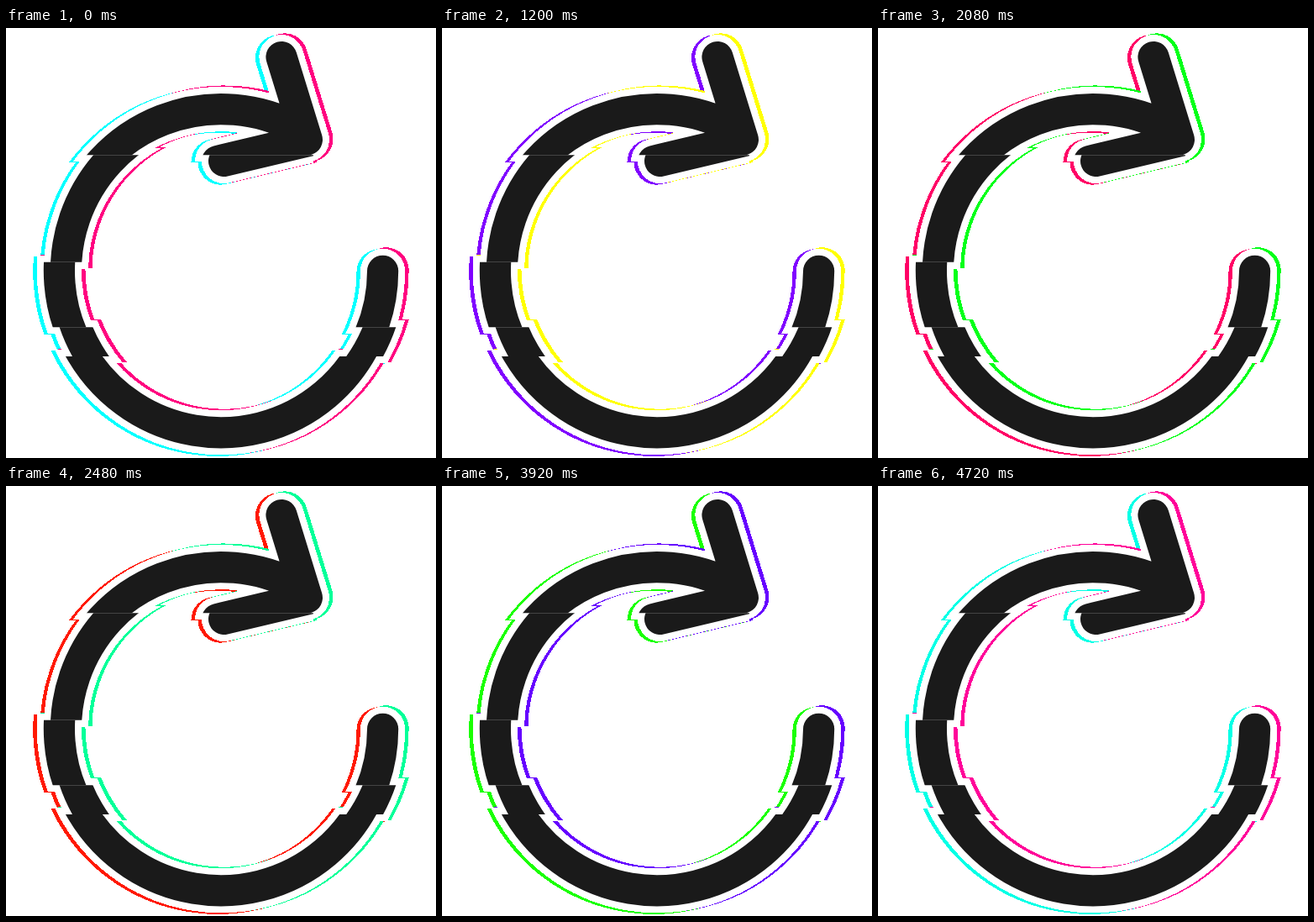
Recreate the animation shown at these times as an HTML page. Size 512 by 512 pixels, loop 4.8 s.

```html
<!DOCTYPE html>
<html>
<head>
<meta charset="utf-8">
<style>
html, body { margin: 0; height: 100%; overflow: hidden; background: #fff; }
svg { display: block; }
</style>
</head>
<body>
<svg id="stage" width="512" height="512" fill="none" stroke-linecap="round" stroke-linejoin="round"></svg>
<script>
const stage = document.getElementById('stage');
const STEP = 80, STEPS = 60;
const STROKE = 37.2, HALO = 8, SHIFT = 8;

// Three quarters of a ring, then the arrow head
const ARROW = 'M448.6 289.3A192.6 192.6 0 1 1 348 120M328 34.5L358.4 133L251.6 158.5';

// Horizontal bands: left, right, top, bottom, sideways shift
const bands = [
  [-20, 532, -20, 151.2, 0],
  [-20, 366, 151.2, 278.85, SHIFT],
  [-20, 380, 278.85, 356.2, 0],
  [380, 532, 240, 356.2, 0],
  [-20, 532, 356.2, 391, SHIFT],
  [-20, 532, 391, 540, 0]
];

function add(parent, tag, attributes) {
  const node = document.createElementNS('http://www.w3.org/2000/svg', tag);
  for (const name in attributes) node.setAttribute(name, attributes[name]);
  return parent.appendChild(node);
}

function addLayer(id, color, halo, extra, x, y) {
  const layer = add(stage, 'g', {
    stroke: color,
    'stroke-width': STROKE + 2 * (halo + extra),
    'shape-rendering': halo ? 'crispEdges' : 'auto',
    transform: `translate(${x} ${y})`
  });
  bands.forEach(([left, right, top, bottom, shift], i) => {
    const clip = add(layer, 'clipPath', { id: id + i });
    const snap = halo ? Math.round : v => v;
    const y0 = snap(top - halo), y1 = snap(bottom + halo);
    add(clip, 'rect', { x: left, y: y0, width: right - left, height: y1 - y0 });
    const band = add(layer, 'g', { 'clip-path': `url(#${id + i})` });
    add(band, 'path', { d: ARROW, transform: `translate(${shift} 0)` });
  });
  return layer;
}

const cool = addLayer('cool', '#0ff', HALO, 0.5, -4, 1);
const warm = addLayer('warm', '#ff0080', HALO, 0.5, 4, -1);
addLayer('gap', '#fff', HALO, 0, 0, 0);
addLayer('body', '#1a1a1a', 0, 0, 0, 0);

const start = performance.now();
function tick() {
  const step = Math.floor((performance.now() - start) / STEP) % STEPS;
  const hue = step * 360 / STEPS;
  cool.setAttribute('stroke', `hsl(${180 + hue}, 100%, 50%)`);
  warm.setAttribute('stroke', `hsl(${330 + hue}, 100%, 50%)`);
  requestAnimationFrame(tick);
}
tick();
</script>
</body>
</html>
```
